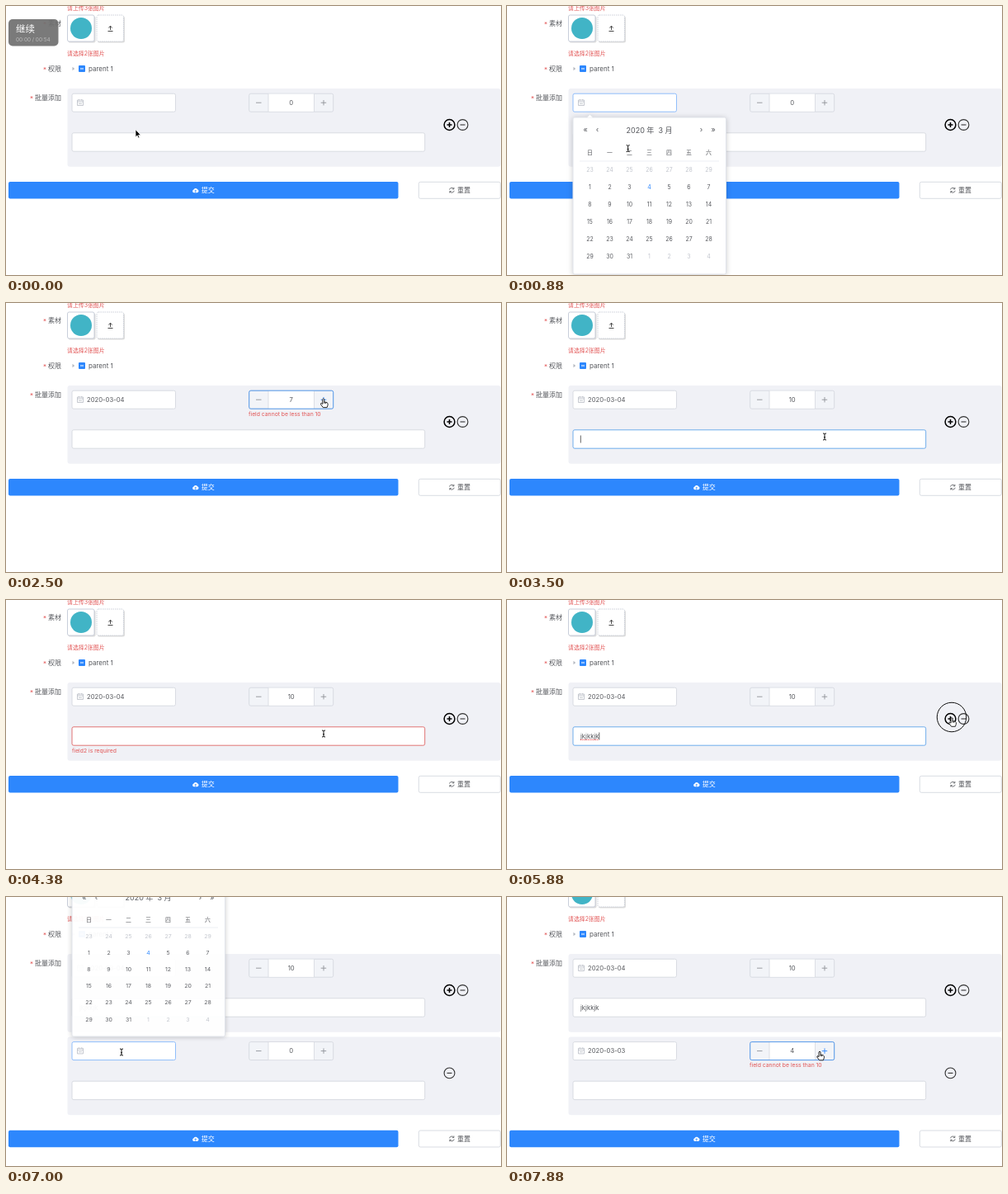
These frames come from a looping animation (600x326 px, 8 s). An HTML page:

```html
<!DOCTYPE html>
<html lang="zh">
<head>
<meta charset="utf-8">
<style>
  html, body { margin: 0; width: 600px; height: 326px; overflow: hidden; background: #fff; }
  svg { display: block; font: 8px Inter, "Noto Sans CJK SC", "Noto Sans CJK", sans-serif; }
  .calendar { filter: drop-shadow(0 1px 3px #0003); }
</style>
</head>
<body>
<svg id="stage" width="600" height="326" viewBox="0 0 600 326"></svg>
<script>
const LOOP = 8000, STEP = 125;
const BLUE = '#2d87fd', RED = '#e25555', LINE = '#d5d8df', INK = '#55575c', GREY = '#909399';
const stage = document.getElementById('stage');

// Drawing helpers; text is placed by its vertical middle
const rect = (x, y, w, h, fill, stroke = 'none', r = 2, extra = '') =>
  `<rect x="${x}" y="${y}" width="${w}" height="${h}" rx="${r}" fill="${fill}" stroke="${stroke}" ${extra}/>`;
const text = (x, y, s, fill = INK, size = 8, anchor = 'start', extra = '') =>
  `<text x="${x}" y="${y + size * .36}" font-size="${size}" fill="${fill}" text-anchor="${anchor}" ${extra}>${s}</text>`;
const path = (d, stroke, width = 1, fill = 'none', extra = '') =>
  `<path d="${d}" stroke="${stroke}" stroke-width="${width}" fill="${fill}" ${extra}/>`;
const circle = (x, y, r, stroke, width, fill = 'none') =>
  `<circle cx="${x}" cy="${y}" r="${r}" stroke="${stroke}" stroke-width="${width}" fill="${fill}"/>`;
const group = (x, y, body, extra = '') => `<g transform="translate(${x} ${y})" ${extra}>${body}</g>`;

const clamp = v => Math.max(0, Math.min(1, v));
const easeOut = p => 1 - (1 - clamp(p)) ** 3;

const label = (y, s) => {
  const x = 67 - s.length * 8;
  return text(x, y, s) + text(x - 6, y + 1, '*', RED, 8);
};

function uploads() {
  const shadow = x => rect(x + 1, 12.5, 33, 32, '#0002', 'none', 2);
  return text(74, 3, '请上传3张图片', RED, 6.9) + label(21.5, '素材') +
    shadow(74.5) + rect(74.5, 11, 32.5, 32, '#fff', '#c3c9d6', 2) +
    circle(91, 27, 13, 'none', 0, '#41b4c6') +
    shadow(110) + rect(110, 11, 32.5, 32, '#fff', '#c8ccd6', 2, 'stroke-dasharray="1.5 1"') +
    path('M126.5 29V24.5M124.3 26.5L126.5 24.2L128.7 26.5M123.5 30.5H129.5', '#333', .9) +
    text(74, 57.5, '请选择2张图片', RED, 6.9);
}

function tree() {
  return label(76, '权限') + path('M80.5 73.8L83.2 76L80.5 78.2Z', 'none', 0, '#b4b8c0') +
    rect(88, 72, 8, 8, BLUE, 'none', 1) + path('M90 76H94', '#fff') + text(100, 76, 'parent 1');
}

function roundButton(x, plus) {
  return circle(x, 44, 6.4, plus ? '#000' : '#333', plus ? 1.5 : 1.1) +
    path(`M${x - 3} 44H${x + 3}` + (plus ? `M${x} 41V47` : ''), plus ? '#000' : '#333', plus ? 1.5 : 1.1);
}

// One repeatable row of the form, drawn from its own top edge
function panel(y, f) {
  let s = rect(74.5, 0, 525, 94.8, '#f0f1f6', 'none', 3);
  s += rect(80, 6.2, 125.5, 22, '#fff', f.dateFocus ? '#85b7fb' : LINE);
  s += path('M86.5 14H93.5V20.5H86.5ZM86.5 16H93.5M88.3 13V14.5M91.7 13V14.5M88 18.3H92', '#b8bcc4', .8);
  s += text(98, 17.2, f.date, INK, 7.7);

  s += rect(294.7, 6.2, 102, 22, '#f2f4f8', LINE) + rect(318, 6.6, 55.5, 21.2, '#fff', 'none', 0);
  s += path('M318 6.5V28M373.5 6.5V28', LINE, .8);
  s += path('M303 17.2H309.5', GREY, .9) + path('M381.7 17.2H388.2M385 14V20.4', f.numFocus ? BLUE : GREY, .9);
  if (f.numFocus) s += rect(294.7, 6.2, 102, 22, 'none', '#4a95ec');
  s += text(345.7, 17.2, f.num, INK, 7.7, 'middle');
  if (f.num > 0 && f.num < 10) s += text(294, 34.2, 'field cannot be less than 10', RED, 6.8);

  s += rect(80, 53.8, 427.7, 22.4, '#fff', f.error ? '#de6666' : f.textFocus ? '#5fa4ea' : LINE);
  s += text(89, 65, f.value, INK, 7.7);
  if (f.textFocus) {
    const end = 89 + [...f.value].reduce((w, c) => w + (c == 'j' ? 1.9 : 4.2), 0);
    if (f.value) s += path(`M89 69.3H${end - .5}`, '#e33', 1, 'none', 'stroke-dasharray="1 .8"');
    s += path(`M${end + .3} 60.5V69.5`, '#222', .7);
  }
  if (f.error) s += text(80, 82.2, 'field2 is required', RED, 6.8);
  s += f.first ? roundButton(537.5, true) + roundButton(553.5) : roundButton(537.5);
  return group(0, y, s);
}

function buttons(y) {
  return group(0, y,
    rect(3, 0, 472.5, 20.5, BLUE) +
    path('M227.7 13.3A1.9 1.9 0 0 1 227.5 9.6A2.5 2.5 0 0 1 232 9.2A2.1 2.1 0 0 1 231.8 13.3Z', 'none', 0, '#fff') +
    path('M229.7 13V10.2M228.4 11.4L229.7 10.1L231 11.4', BLUE, .7) +
    text(236.7, 10.2, '提交', '#fff', 8, 'start', 'font-weight="500"') +
    rect(500.3, .3, 99, 20, '#fff', LINE) +
    path('M537.5 9.6A2.9 2.9 0 0 1 542.8 8.7M543.2 10.8A2.9 2.9 0 0 1 537.9 11.8M542.9 6.8V8.9H540.9M537.8 13.6V11.6H539.8', INK, .8) +
    text(547, 10.2, '重置', INK, 8, 'start', 'font-weight="500"'));
}

function calendar(top, size, above, selected) {
  if (size <= .01) return '';
  const colX = i => 20.5 + 24 * i;
  let s = rect(0, 0, 185.5, 190, '#fff', '#e0e3ea');
  if (!above) s += path('M17 .3L20.5 -3.5L24 .3', '#e0e3ea', .6, '#fff');
  [['«', 15], ['‹', 29.5], ['›', 155.5], ['»', 170]].forEach(([c, x]) => s += text(x, 15, c, INK, 9, 'middle'));
  s += text(92.5, 15.4, '2020 年&#160; 3 月', INK, 9, 'middle');
  [...'日一二三四五六'].forEach((c, i) => s += text(colX(i), 42.7, c, INK, 6.9, 'middle'));
  s += path('M8 53H177', '#e6e9f0', .7);
  for (let i = 0; i < 42; i++) {
    const x = colX(i % 7), y = 63.5 + 21 * (i / 7 | 0), day = new Date(2020, 1, 23 + i).getDate();
    const inMonth = i >= 7 && i < 38, picked = inMonth && day == selected;
    if (picked) s += circle(x, y, 6.9, 'none', 0, BLUE);
    const fill = picked ? '#fff' : !inMonth ? '#c0c4cc' : day == 4 ? BLUE : INK;
    s += text(x, y, day, fill, 6.9, 'middle');
  }
  const y = above ? top + 190 * (1 - size) : top;
  return `<g class="calendar" opacity="${size}" transform="translate(80 ${y}) scale(1 ${size})">${s}</g>`;
}

const popupSize = (t, open, close) => easeOut((t - open) / 300) * (1 - easeOut((t - close) / 300));

// Pointer stops: time, x, y, shape
const stops = [
  [0, 157, 149.7, 'arrow'], [125, 157, 149.7, 'arrow'], [375, 140, 118, 'beam'], [625, 140, 118, 'beam'],
  [1000, 150, 200, 'hand'], [1375, 172, 218, 'hand'], [1625, 173, 221, 'hand'], [1750, 331, 138, 'arrow'],
  [1875, 384.7, 115.8, 'hand'], [2875, 384.7, 115.8, 'hand'], [3125, 385, 162, 'beam'], [3625, 385, 162, 'beam'],
  [3875, 390, 186, 'arrow'], [4125, 385, 162, 'beam'], [5375, 385, 162, 'beam'], [5750, 539, 142.5, 'hand'],
  [6000, 539, 142.5, 'hand'], [6250, 512, 188, 'arrow'], [6875, 140, 188, 'beam'], [7000, 140, 188, 'beam'],
  [7250, 148, 64, 'hand'], [7375, 148, 64, 'hand'], [7500, 379, 187, 'hand'], [8000, 379, 187, 'hand']
];
const shapes = {
  arrow: path('M0 0V9L2.1 7.2L3.5 10.3L4.9 9.7L3.5 6.7H6.3Z', '#fff', .7, '#000'),
  hand: path('M-1 .9Q0 -.9 1 .9V4L4.3 4.8Q5.8 5.3 5.4 7.8L4.4 10.8H-.4L-3.2 7Q-3.4 5.3 -2 5.8L-1 6.7ZM1 4V6M2.7 4.5V6.3', '#111', .9, '#fff'),
  beam: path('M-2 -4Q0 -4 0 -3Q0 -4 2 -4M0 -3V3M-2 4Q0 4 0 3Q0 4 2 4M-1 .8H1', '#111', 1)
};

function pointer(t) {
  const i = stops.findLastIndex(s => s[0] <= t);
  const a = stops[i], b = stops[i + 1] || a;
  const p = b == a ? 0 : (t - a[0]) / (b[0] - a[0]);
  return group(a[1] + (b[1] - a[1]) * p, a[2] + (b[2] - a[2]) * p, shapes[a[3]]);
}

function playerBadge(t) {
  const alpha = 1 - clamp((t - 125) / 500);
  return `<g opacity="${alpha}">` + rect(3, 16, 60.5, 32.5, '#707070', 'none', 5, 'fill-opacity=".93"') +
    text(12, 28, '继续', '#fff', 11.5, 'start', 'font-weight="500"') +
    text(12, 40.3, '00:00 / 00:54', '#b9b9b9', 6.4) + '</g>';
}

const count = (t, start) => t < start ? 0 : Math.min(10, Math.floor((t - start) / 100) + 1);
const between = (t, a, b) => t >= a && t < b;

function draw(t) {
  const added = t >= 6000, scroll = t >= 6250 ? 31 : 0;
  const typed = 'jkjkkjk'.slice(0, Math.max(0, Math.floor((t - 4500) / 100)));
  let page = uploads() + tree() + label(111, '批量添加') + panel(100, {
    first: true,
    date: t >= 1500 ? '2020-03-04' : '', dateFocus: between(t, 500, 1750),
    num: count(t, 1875), numFocus: between(t, 1875, 3000),
    value: typed, textFocus: between(t, 3250, 3875) || between(t, 4500, 6000),
    error: t >= 3875 && !typed
  });
  if (added) page += panel(200.4, {
    date: t >= 7375 ? '2020-03-03' : '', dateFocus: between(t, 6875, 7500),
    num: count(t, 7500), numFocus: t >= 7500, value: ''
  });
  page += buttons(added ? 313.7 : 213);
  if (between(t, 5750, 6000)) page += circle(539, 142, 7 + (t - 5750) * .086, '#111', 1);

  let s = group(0, -scroll, page, 'stroke-width=".9"');
  s += calendar(135, popupSize(t, 500, 1576), false, t >= 1500 ? 4 : 0);
  s += calendar(-21, popupSize(t, 6800, 7326), true, t >= 7250 ? 3 : 0);
  if (scroll) s += `<g opacity="${1 - clamp((t - 6625) / 375)}">` + rect(598.6, 127, 3, 191.5, '#777', 'none', 1.5) + '</g>';
  stage.innerHTML = s + playerBadge(t) + pointer(t);
}

let shown = -1;
function tick() {
  const t = Math.floor((performance.now() % LOOP + 4) / STEP) * STEP % LOOP;
  if (t !== shown) draw(shown = t);
  requestAnimationFrame(tick);
}
tick();
</script>
</body>
</html>
```
